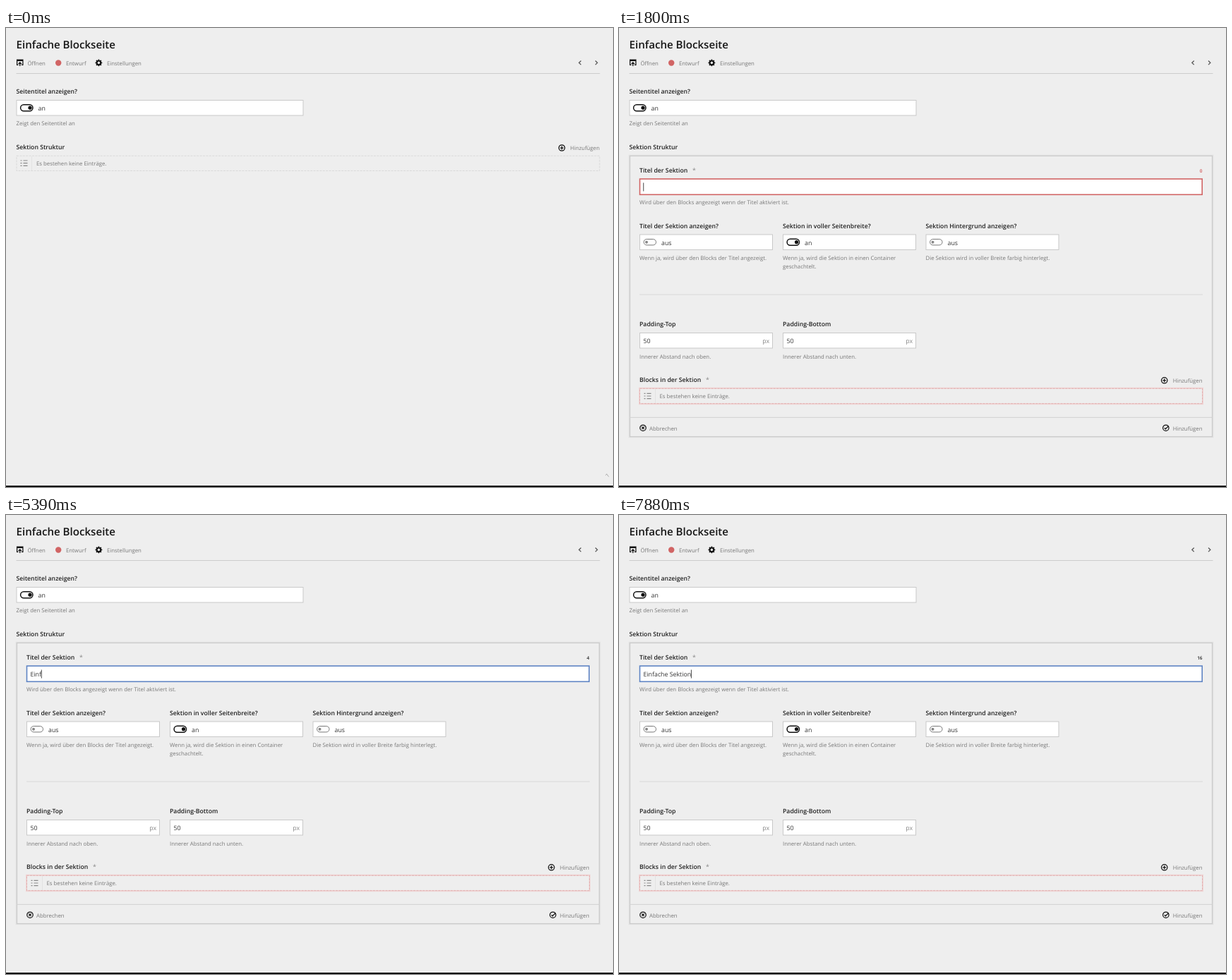
Recreate the animation shown at these times as an HTML page. Size 860 px wide and 651 px high, loop 8 s.

```html
<!DOCTYPE html>
<html lang="de">
<head>
<meta charset="utf-8">
<style>
html, body { margin: 0; width: 100%; height: 100%; overflow: hidden; background: #eee; }
svg { display: block; width: 860px; height: 651px; }
text { font: 7.8px "Open Sans", "Noto Sans", sans-serif; fill: #787878; text-rendering: geometricPrecision; white-space: pre; }
text.title { font-size: 15.1px; font-weight: 600; fill: #161616; }
text.label { font-size: 8.7px; font-weight: 600; fill: #202020; }
text.value { font-size: 8.8px; fill: #333; }
text.unit { font-size: 8.8px; fill: #888; }
text.count { font-size: 6.4px; font-weight: 600; fill: #222; }
.end { text-anchor: end; }
.field { fill: #fff; stroke: #c9c9c9; }
.line { fill: none; stroke: #d2d2d2; }
.icon { fill: none; stroke: #111; stroke-width: 1.25; }
</style>
</head>
<body>
<svg viewBox="0 0 860 651">
  <defs>
    <g id="plus" class="icon"><circle r="4.2"/><path d="M-2.4 0H2.4M0-2.4V2.4"/></g>
    <g id="cross" class="icon"><circle r="4.2"/><path d="M-1.7-1.7 1.7 1.7M1.7-1.7-1.7 1.7"/></g>
    <g id="check" class="icon"><circle r="4.2"/><path d="M-2 0-.5 1.6 3.6-2.6"/></g>
    <g id="on"><rect class="icon" x="-8.7" y="-4.5" width="17.4" height="9" rx="4.5" style="stroke-width:1.5"/><circle cx="4.7" r="2.6" fill="#111"/></g>
    <g id="off"><rect class="icon" x="-8.7" y="-4.2" width="17.4" height="8.4" rx="4.2" style="stroke:#777;stroke-width:1"/><circle cx="-4.8" r="2" fill="#888"/></g>
    <g id="list"><path d="M-5-3.7h2M-5 0h2M-5 3.7h2M-1-3.7h6M-1 0h6M-1 3.7h6" stroke="#888" stroke-width="1.2"/></g>
  </defs>
  <g id="base"></g>
  <g id="empty"></g>
  <g id="form"></g>
  <path id="mark" class="line" d="M849.5 634.5l1.5-2 3 4" style="stroke:#aaa"/>
  <path d="M0 650H860" stroke="#111" stroke-width="2"/>
</svg>
<script>
const $ = id => document.getElementById(id);
const text = (x, y, str, cls = '') => `<text x="${x}" y="${y}" class="${cls}">${str}</text>`;
const icon = (id, x, y) => `<use href="#${id}" x="${x}" y="${y}"/>`;
const box = (x, y, w, h, extra = 'class="field"') =>
  `<rect x="${x}" y="${y}" width="${w}" height="${h}" ${extra}/>`;
const path = (d, extra = 'class="line"') => `<path d="${d}" ${extra}/>`;

const toggle = (x, y, w, label, on, help) =>
  text(x, y, label, 'label') + box(x + .5, y + 9.5, w, 21.5) +
  icon(on ? 'on' : 'off', x + 14.8, y + 20.2) + text(x + 31, y + 24, on ? 'an' : 'aus', 'value') +
  help.map((str, i) => text(x, y + 45.3 + i * 12, str)).join('');

const number = (x, label, help) =>
  text(x, 423, label, 'label') + box(x + .5, 432.5, 188, 21.5) +
  text(x + 5.5, 447.2, '50', 'value') + text(x + 184, 447.2, 'px', 'unit end') + text(x, 468.5, help);

$('base').innerHTML =
  text(14.5, 29, 'Einfache Blockseite', 'title') +
  path('M17.5 52.3H15.6V45H23.9V52.3H22M15.6 46.4H23.9M19.75 54V49M17.6 51 19.75 48.8 21.9 51', 'class="icon"') +
  text(30.5, 52.7, 'Öffnen') +
  '<circle cx="74.2" cy="49.5" r="4.2" fill="#d16464"/>' + text(85, 52.7, 'Entwurf') +
  '<g fill="none" stroke="#111" transform="translate(131.4 49.3)"><circle r="2.8" stroke-width="2.2"/>' +
  '<circle r="4.1" stroke-width="1.6" pathLength="16" stroke-dasharray="1" stroke-dashoffset=".5"/></g>' +
  text(143, 52.7, 'Einstellungen') +
  path('M814.7 46.5 811.8 49.3 814.7 52.1M835 46.5 837.9 49.3 835 52.1', 'class="icon" style="stroke:#555"') +
  path('M14.5 64.5H841.5', 'class="line" style="stroke:#ccc"') +
  toggle(14.5, 93, 406, 'Seitentitel anzeigen?', true, ['Zeigt den Seitentitel an']) +
  text(14.5, 171.5, 'Sektion Struktur', 'label');

$('empty').innerHTML =
  icon('plus', 787.5, 170) + text(841, 173.2, 'Hinzufügen', 'end') +
  box(15, 181.3, 826, 21.2, 'id="dash" class="line" style="stroke:#c6c6c6" stroke-dasharray="3 1.4"') +
  path('M36.5 182V202', 'class="line" style="stroke:#e2e2e2"') +
  icon('list', 25.5, 191.7) + text(43, 194.9, 'Es bestehen keine Einträge.');

$('form').innerHTML =
  box(15, 181, 826, 399, 'class="line" stroke-width="2.4" style="stroke:#dedede"') +
  box(15.5, 181.5, 825, 398, 'class="line" style="stroke:#cbcbcb"') +
  text(29, 204.8, 'Titel der Sektion', 'label') + text(104, 205, '*', 'unit') +
  text(826.5, 204.6, '', 'count end') +
  box(29.5, 214.1, 796.7, 22.2, 'id="input" fill="#fff" stroke-width="1.6"') +
  text(34.5, 229.2, '', 'value typed') +
  '<rect id="caret" y="219.5" width=".9" height="12" fill="#333"/>' +
  text(29, 250.2, 'Wird über den Blocks angezeigt wenn der Titel aktiviert ist.') +
  toggle(29, 283.5, 188, 'Titel der Sektion anzeigen?', false, ['Wenn ja, wird über den Blocks der Titel angezeigt.']) +
  toggle(232, 283.5, 188, 'Sektion in voller Seitenbreite?', true, ['Wenn ja, wird die Sektion in einen Container', 'geschachtelt.']) +
  toggle(434.5, 283.5, 188, 'Sektion Hintergrund anzeigen?', false, ['Die Sektion wird in voller Breite farbig hinterlegt.']) +
  path('M29 378H827', 'class="line" style="stroke:#d8d8d8"') +
  number(29, 'Padding-Top', 'Innerer Abstand nach oben.') +
  number(232, 'Padding-Bottom', 'Innerer Abstand nach unten.') +
  text(29, 501.7, 'Blocks in der Sektion', 'label') + text(123, 502, '*', 'unit') +
  icon('plus', 772.7, 499.8) + text(826.5, 503.2, 'Hinzufügen', 'end') +
  box(29, 510.8, 798, 22.4, 'fill="none" stroke="#efd3d3" stroke-width="2"') +
  box(29.5, 511.3, 797, 21.4, 'fill="none" stroke="#dfa8a8" stroke-dasharray="3 1.4" stroke-width=".8"') +
  path('M51.5 512V532', 'class="line" style="stroke:#e2e2e2"') +
  icon('list', 40.5, 522) + text(57.5, 525.4, 'Es bestehen keine Einträge.') +
  path('M15 552.3H841', 'class="line" style="stroke:#d0d0d0"') +
  icon('cross', 34, 567.2) + text(43, 570.5, 'Abbrechen') +
  icon('check', 774.8, 567.2) + text(826.5, 570.5, 'Hinzufügen', 'end');

const phrase = 'Einfache Sektion';
const keys = [4840, 4980, 5250, 5390, 5530, 5670, 5810, 5940, 6220, 6500, 6770, 6910, 7190, 7470, 7610, 7880];
const typed = document.querySelector('.typed'), count = document.querySelector('.count');
const show = (id, on) => $(id).setAttribute('visibility', on ? 'visible' : 'hidden');

function draw(t) {
  const open = t >= 1800;
  const n = keys.filter(k => k <= t).length;
  show('empty', !open);
  show('form', open);
  show('mark', t < 140);
  $('dash').setAttribute('opacity', Math.min(1, .5 + t / 2220));
  typed.textContent = phrase.slice(0, n);
  count.textContent = n;
  count.style.fill = n ? '#222' : '#d05050';
  $('input').setAttribute('stroke', n ? '#5f84c4' : '#d16464');
  const width = n ? typed.getComputedTextLength() : 0;
  $('caret').setAttribute('x', 34.3 + width);
  const blinkOn = Math.floor((t - 1800) / 540) % 2 === 0;
  show('caret', open && (n > 0 || blinkOn));
}

const start = performance.now();
function frame() {
  draw((performance.now() - start) % 8000);
  requestAnimationFrame(frame);
}
frame();
</script>
</body>
</html>
```
